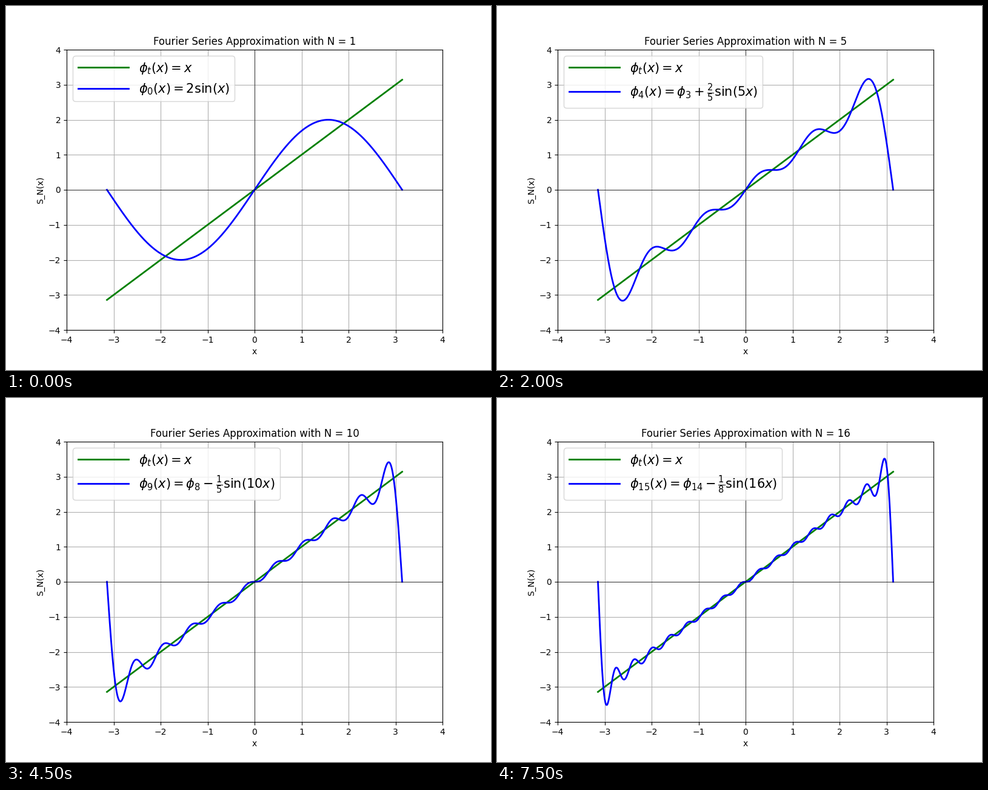
Recreate the animation shown at these times as a matplotlib script. Size 800 px wide and 600 px high, loop 8000 ms.

```python
import matplotlib.pyplot as plt
import numpy as np
from matplotlib.animation import FuncAnimation

TERMS = 16
INTERVAL = 500

x = np.linspace(-np.pi, np.pi, 1000)


def partial_sum(n):
    k = np.arange(1, n + 1)[:, None]
    return np.sum(2 * (-1.0) ** (k + 1) / k * np.sin(k * x), axis=0)


def coefficient(n):
    """Reduced form of 2/n as math text."""
    top, bottom = (2, n) if n % 2 else (1, n // 2)
    if bottom == 1:
        return "" if top == 1 else str(top)
    return rf"\frac{{{top}}}{{{bottom}}}"


def formula(n):
    left = rf"\phi_{{{n - 1}}}(x) = "
    if n == 1:
        return rf"${left}2\sin(x)$"
    sign = "+" if n % 2 else "-"
    return rf"${left}\phi_{{{n - 2}}} {sign} {coefficient(n)}\sin({n}x)$"


fig, ax = plt.subplots(figsize=(8, 6), dpi=100)
ax.plot(x, x, color="green", lw=2, label=r"$\phi_t(x) = x$")
curve, = ax.plot(x, partial_sum(1), color="blue", lw=2)
ax.axhline(0, color="black", lw=0.5)
ax.axvline(0, color="black", lw=0.5)
ax.set(xlim=(-4, 4), ylim=(-4, 4), xlabel="x", ylabel="S_N(x)")
ax.grid(True)


def update(i):
    n = i + 1
    curve.set_ydata(partial_sum(n))
    curve.set_label(formula(n))
    ax.set_title(f"Fourier Series Approximation with N = {n}")
    ax.legend(loc="upper left", fontsize=15, handlelength=4)
    return curve,


anim = FuncAnimation(fig, update, frames=TERMS, interval=INTERVAL,
                     repeat=True, repeat_delay=0, blit=False)
plt.show()
```
